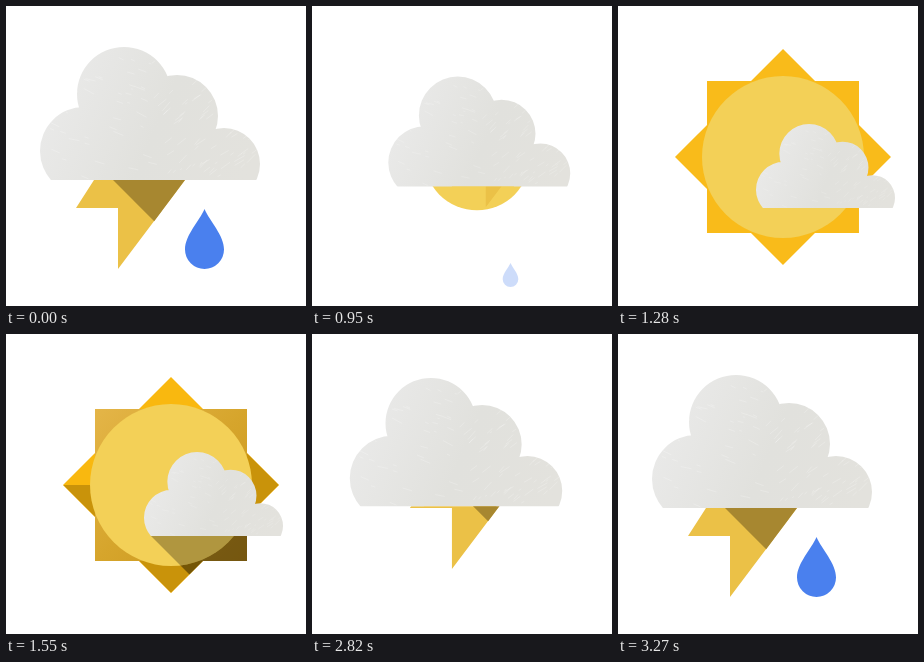
Animation of 300 by 300 pixels, one loop 3.3 s. Source, as an HTML page with a canvas:

```html
<!DOCTYPE html>
<html lang="en">
<head>
<meta charset="utf-8">
<title>Weather</title>
<style>
html, body { margin: 0; width: 100%; height: 100%; overflow: hidden; background: #fff; }
canvas { display: block; width: 100vw; height: 100vh; }
</style>
</head>
<body>
<canvas id="stage" width="300" height="300"></canvas>
<script>
const ctx = document.getElementById('stage').getContext('2d');
const LOOP = 3300, STEP = 30, TAU = Math.PI * 2;
const SUN = { x: 165, y: 151 };

const clamp = v => Math.max(0, Math.min(1, v));
const span = (t, from, to) => clamp((t - from) / (to - from));
const mix = (a, b, k) => a + (b - a) * k;
const easeOut = k => 1 - (1 - k) ** 3;
const easeInOut = k => k * k * (3 - 2 * k);

function poly(points, color) {
  ctx.beginPath();
  points.forEach(([x, y]) => ctx.lineTo(x, y));
  ctx.closePath();
  ctx.fillStyle = color;
  ctx.fill();
}

function layer(draw) {
  ctx.save();
  draw();
  ctx.restore();
}

function linear(x0, y0, x1, y1, ...colors) {
  const g = ctx.createLinearGradient(x0, y0, x1, y1);
  colors.forEach((c, i) => g.addColorStop(i / (colors.length - 1), c));
  return g;
}

// Cloud, with its bottom centre at the origin
const lobes = [[-66, -29, 44], [-26, -86, 47], [27, -64, 41], [74, -16, 36]];
const cloudShape = new Path2D();
for (const [x, y, r] of lobes) {
  cloudShape.moveTo(x + r, y);
  cloudShape.arc(x, y, r, 0, TAU);
}
cloudShape.rect(-66, -44, 140, 44);

let seed = 7;
const random = () => (seed = (seed * 16807) % 2147483647) / 2147483647;
const scratches = new Path2D();
for (let i = 0; i < 150; i++) {
  const x = -110 + random() * 220, y = -133 + random() * 133;
  const len = 2 + random() * 10;
  const angle = x < 0 ? 0.2 + random() * 0.3 : -0.9 + random() * 0.4;
  scratches.moveTo(x, y);
  scratches.lineTo(x + len * Math.cos(angle), y + len * Math.sin(angle));
}

function cloud(x, y, scale) {
  if (scale <= 0) return;
  layer(() => {
    ctx.translate(x, y);
    ctx.scale(scale, scale);
    ctx.beginPath();
    ctx.rect(-120, -140, 240, 140);
    ctx.clip();
    ctx.fillStyle = linear(-90, -90, 100, -10, '#e9e9e8', '#e1e1dd', '#e3e2dd');
    ctx.fill(cloudShape);
    ctx.clip(cloudShape);
    ctx.strokeStyle = 'rgba(255,255,255,.3)';
    ctx.lineWidth = 0.7;
    ctx.stroke(scratches);
  });
}

// The bolt slides diagonally out from behind the cloud's lower edge
function bolt(shift, edge) {
  layer(() => {
    ctx.beginPath();
    ctx.rect(0, edge, 300, 300);
    ctx.clip();
    ctx.translate(shift, -shift);
    poly([[88, 174], [179, 174], [112, 263], [112, 202], [70, 202]], '#ebc147');
    poly([[107, 174], [179, 174], [148.2, 215.2]], '#a78730');
  });
}

function drop(y, scale, alpha) {
  if (scale <= 0 || alpha <= 0) return;
  layer(() => {
    ctx.globalAlpha = alpha;
    ctx.translate(198.5, y);
    ctx.scale(scale, scale);
    ctx.beginPath();
    ctx.moveTo(0, -30);
    ctx.bezierCurveTo(5, -18, 19.5, -4, 19.5, 10.5);
    ctx.arc(0, 10.5, 19.5, 0, Math.PI);
    ctx.bezierCurveTo(-19.5, -4, -5, -18, 0, -30);
    ctx.fillStyle = '#4a80ee';
    ctx.fill();
  });
}

const diamond = [[0, -108], [108, 0], [0, 108], [-108, 0]];
const square = [[-76, -76], [76, -76], [76, 76], [-76, 76]];

function castShadow(alpha) {
  poly([[-20, 51], [140, 51], [140, 211]], `rgba(0,0,0,${alpha})`);
}

function sun(t) {
  const rays = span(t, 860, 1301);
  const size = easeOut(rays);
  const shade = span(t, 1310, 1550);
  layer(() => {
    ctx.translate(SUN.x, SUN.y);
    layer(() => {
      ctx.rotate((1 - size) * 67 * Math.PI / 180);
      ctx.scale(size, size);
      ctx.globalAlpha = rays;
      const outline = new Path2D();
      for (const shape of [diamond, square]) {
        shape.forEach(([x, y], i) => i ? outline.lineTo(x, y) : outline.moveTo(x, y));
        outline.closePath();
      }
      ctx.fillStyle = '#f9b80f';
      ctx.fill(outline);
      if (shade > 0) {
        ctx.globalAlpha = shade;
        ctx.clip(outline);
        poly([[-108, 0], [-76, 0], [-76, 32]], '#c9930a');
        poly([[76, -32], [108, 0], [76, 32]], '#c9930a');
        poly([[-32, 76], [32, 76], [0, 108]], '#c9930a');
        poly(square, linear(-76, -76, 76, 76, '#e4b548', '#d6a52c', '#c9951a'));
        castShadow(0.42);
      }
    });
    ctx.beginPath();
    ctx.arc(0, 0, 81 * easeOut(span(t, 830, 1230)), 0, TAU);
    ctx.fillStyle = '#f3d057';
    ctx.fill();
    if (shade > 0) {
      ctx.clip();
      ctx.globalAlpha = shade;
      castShadow(0.28);
    }
  });
}

function clearUp(t) {
  const k = (t - 770) / STEP;
  const move = easeInOut(span(t, 830, 1080));
  const slide = 14 * easeOut(span(t, 1040, 1300));
  const y = mix(174, 188, move) + slide;
  sun(t);
  if (k < 8) {
    bolt(89 * (k / 8) ** 1.27, y);
    drop(233 + 6 * k, 1 - 0.1 * k, 1 - 0.12 * k);
  }
  cloud(mix(144, 193.5, move) + slide, y, mix(1, 0.632, move));
}

function stormIn(t) {
  const size = easeOut(span(t, 2550, 2950));
  const edge = 125 + 49 * size;
  const fall = easeOut(span(t, 2850, 3270));
  if (t > 2622) bolt(89 * (1 - easeOut(span(t, 2622, 3240))), edge);
  drop(mix(205, 233, fall), fall, fall);
  cloud(144, edge, size);
}

const stepped = (t, from) => from + STEP * Math.floor((t - from) / STEP);

function render(t) {
  ctx.fillStyle = '#fff';
  ctx.fillRect(0, 0, 300, 300);
  if (t < 800) stormIn(LOOP);
  else if (t < 2550) clearUp(stepped(t, 800));
  else stormIn(stepped(t, 2550));
}

const start = performance.now();
function tick() {
  render((performance.now() - start) % LOOP);
  requestAnimationFrame(tick);
}
tick();
</script>
</body>
</html>
```
